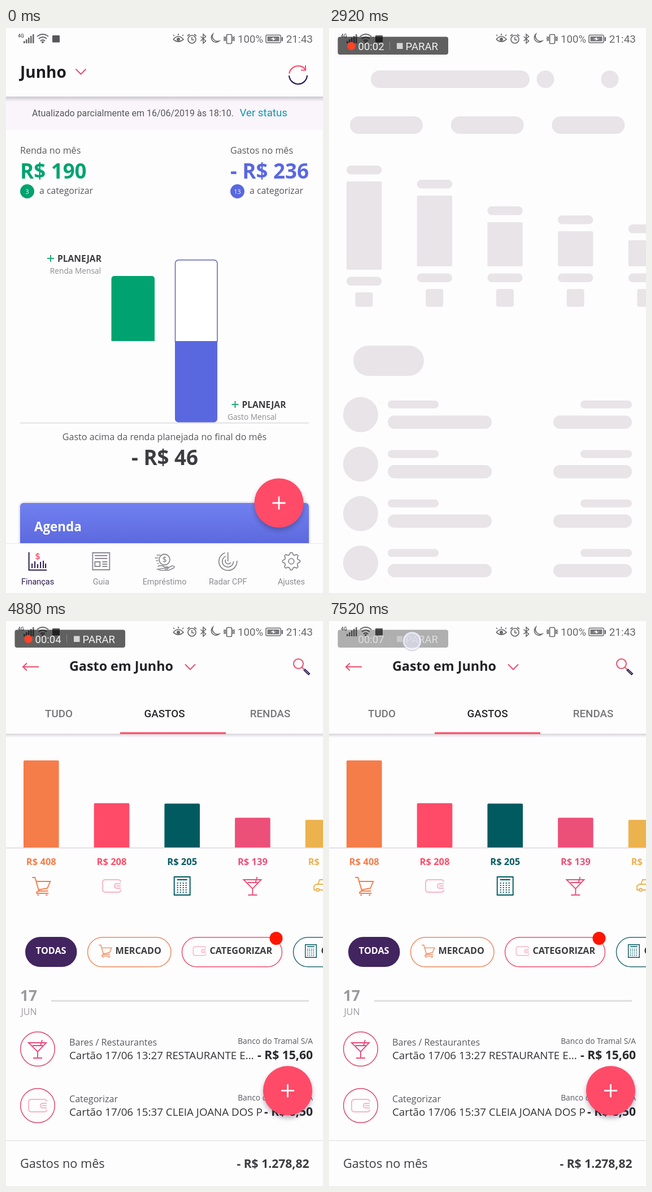
An HTML page with a canvas for the animation above (7560 ms loop, 561 by 998 pixels).

```html
<!DOCTYPE html>
<html lang="pt-BR">
<head>
<meta charset="utf-8">
<title>Finanças</title>
<style>
html, body { margin: 0; width: 100%; height: 100%; overflow: hidden; background: #fefdfe; }
canvas { display: block; }
</style>
</head>
<body>
<canvas id="stage" width="561" height="998"></canvas>
<script>
const c = document.getElementById('stage').getContext('2d');
const W = 561, H = 998, LOOP = 7560, STEP = 40;
const OPEN = '"Open Sans", sans-serif', ROBO = 'Roboto, sans-serif';
const PAPER = '#fefdfe', PINK = '#ff4b68', ROSE = '#e9506f', BLUSH = '#fab4c6', GREEN = '#00a36f',
  FOREST = '#00602f', BLUE = '#5968df', ORANGE = '#f47d4a', TEAL = '#005a60', MAGENTA = '#e8497a',
  YELLOW = '#ecb24e', INK = '#2b1a4d', DARK = '#3d3c40', TEXT = '#58575c', GRAY = '#8d8b91',
  BONE = '#e8e4e8', STATUS = '#69686c';

const clamp = u => Math.max(0, Math.min(1, u));
const quadOut = u => 1 - (1 - clamp(u)) ** 2;

function text(s, x, y, size, color, weight = 400, align = 'left', font = OPEN) {
  c.font = `${weight} ${size}px ${font}`;
  c.textAlign = align;
  c.fillStyle = color;
  c.fillText(s, x, y);
}
function box(x, y, w, h, r, fill, stroke, lw = 1.5) {
  c.beginPath();
  c.roundRect(x, y, w, h, r);
  if (fill) { c.fillStyle = fill; c.fill(); }
  if (stroke) { c.strokeStyle = stroke; c.lineWidth = lw; c.stroke(); }
}
function disc(x, y, r, fill, stroke, lw = 1.5) {
  c.beginPath();
  c.arc(x, y, r, 0, 7);
  if (fill) { c.fillStyle = fill; c.fill(); }
  if (stroke) { c.strokeStyle = stroke; c.lineWidth = lw; c.stroke(); }
}
function path(d, x, y, color, lw = 2, k = 1, fill = false) {
  c.save();
  c.translate(x, y);
  c.scale(k, k);
  if (fill) { c.fillStyle = color; c.fill(new Path2D(d)); }
  else { c.strokeStyle = color; c.lineWidth = lw / k; c.stroke(new Path2D(d)); }
  c.restore();
}
function shade(y, h, alpha) {
  const g = c.createLinearGradient(0, y, 0, y + h);
  g.addColorStop(0, `rgba(60,50,70,${alpha})`);
  g.addColorStop(1, 'rgba(60,50,70,0)');
  c.fillStyle = g;
  c.fillRect(0, y, W, h);
}
const chevron = (x, y) => path('M-9 -4.5L0 4.5L9 -4.5', x, y, ROSE, 2);
const plus = (x, y, r, color, lw) => path(`M${-r} 0H${r}M0 ${-r}V${r}`, x, y, color, lw);

function fab(x, y) {
  c.save();
  c.shadowColor = 'rgba(40,30,60,.34)';
  c.shadowBlur = 9;
  c.shadowOffsetY = 5;
  disc(x, y, 43.6, PINK);
  c.restore();
  plus(x, y, 11.5, '#fff', 2.8);
}
function touch(x, y) {
  disc(x, y, 17, 'rgba(224,223,240,.72)', 'rgba(140,140,165,.45)', 1);
  disc(x, y, 14.5, null, 'rgba(255,255,255,.55)', 2.5);
}

// Category icons, centred on 0,0
const keys = [-5, -1, 3, 7, 11].map(y => `M-9 ${y}h2m3 0h2m3 0h2m3 0h2`).join('');
const ICONS = {
  wallet: 'M16 -7Q16 -11 11 -11H-11Q-16 -11 -16 -6V6Q-16 11 -11 11H11Q16 11 16 7M16 -4H9Q5 -4 5 0T9 4H16M8 0H16',
  cart: 'M-16 -15H-11L-4 9H12M-9 -8H16L11 4L-5 7M-4 9Q-9 10 -8 13H13M-7 16h3M8 16h3',
  calc: 'M-14 -16H14V16H-14ZM-9 -11H9' + keys,
  glass: 'M-16 -11H15L0 5ZM0 5V16M-8 16H8M-9 -6H9M5 -6L8 -16',
  car: 'M-12 7H-16V0L-12 -3H-9L-6 -11H8L13 -3L17 0V7H13M-7 7H7M-9 -3H13M-12 7a2.5 2.5 0 0 0 5 0a2.5 2.5 0 0 0 -5 0',
  cash: 'M-12 -3L-15 0L-12 3M12 -3L15 0L12 3M-3 -13L0 -16L3 -13M-3 13L0 16L3 13'
};
function icon(name, x, y, color, k = 1) {
  path(ICONS[name], x, y, color, k < 1 ? 1.4 : 1.9, k);
  if (name === 'cash') text('$', x, y + 6 * k, 17 * k, color, 700, 'center');
}

function statusBar() {
  text('4G', 21, 17, 8.5, STATUS, 700, 'left', ROBO);
  for (let i = 0; i < 5; i++) { c.fillStyle = STATUS; c.fillRect(31 + i * 4, 23 - i * 3, 2.6, 4 + i * 3); }
  path('M-10 -5Q0 -13 10 -5M-7 -1Q0 -7 7 -1M-4 3Q0 -1 4 3', 65, 20, STATUS, 2);
  disc(65, 25, 2, STATUS);
  box(82, 13, 13, 12.5, 1, '#57565a');
  path('M-9 1Q0 -9 9 1Q0 9 -9 1M-7 -5L-9 -7M0 -6V-9M7 -5L9 -7', 305, 19, STATUS, 1.7);
  disc(305, 20, 3, STATUS);
  disc(329, 20, 7, null, STATUS, 1.7);
  path('M0 -4V1H4M-8 -6L-4 -9M8 -6L4 -9', 329, 20, STATUS, 1.7);
  path('M-4.5 -4L4.5 4L0 8V-8L4.5 -4L-4.5 4', 349, 19, STATUS, 1.6);
  path('M-3 -8A8 8 0 1 0 8 4A9 9 0 0 1 -3 -8Z', 369, 19, STATUS, 1.7);
  box(390.5, 11.5, 9, 16, 1.5, null, STATUS, 1.7);
  path('M-6.5 -4V4M6.5 -4V4M-9.5 -4l1.5 2l-1.5 2l1.5 2l-1.5 2M9.5 -4l-1.5 2l1.5 2l-1.5 2l1.5 2', 395, 19, STATUS, 1.4);
  text('100%', 410, 26.3, 18.7, STATUS, 400, 'left', ROBO);
  box(460, 12.5, 26, 13.5, 2, null, STATUS, 1.5);
  box(462.5, 15, 21, 8.5, 0, '#77767a');
  c.fillStyle = STATUS; c.fillRect(487.5, 16, 2.5, 7);
  path('M-6 1L1 -3V0L6 -1L-1 3V0Z', 473, 19.3, '#fff', 1, 1, true);
  text('21:43', 543, 26.3, 19, STATUS, 400, 'right', ROBO);
}

function navBar() {
  c.fillStyle = PAPER;
  c.fillRect(0, 910, W, 88);
  c.fillStyle = '#e9e7ea';
  c.fillRect(0, 910, W, 1);
  const at = i => W / 5 * (i + .5);
  ['Finanças', 'Guia', 'Empréstimo', 'Radar CPF', 'Ajustes'].forEach((s, i) =>
    text(s, at(i), 982.5, 14.4, i ? GRAY : INK, 400, 'center', ROBO));
  path('M-15.5 -16V15.5H16M-10 12V4M-5 12V0M0 12V5M5 12V1M10 12V-1M14 12V4', at(0), 942, INK, 2);
  text('$', at(0), 938.5, 16, PINK, 600, 'center');
  path('M-15 -15H15V15H-15ZM-11 -10H11M-11 -5H11M-11 1H-2V9H-11ZM2 1H11M2 5H11M2 9H11', at(1), 942, GRAY, 1.9);
  disc(280.5, 939, 9.5, null, GRAY, 1.8);
  text('$', 280.5, 944, 13.5, GRAY, 600, 'center');
  path('M-14 -11H-7M-17 -6H-11M-15 -1H-11M-13 4H-10M-12 9Q-6 6 0 10H6Q8 13 4 14H0M7 11L14 8Q20 9 16 12L7 16H-7L-12 14Z', at(2), 942, GRAY, 1.7);
  path('M0 -16V0M-5 -15A16 16 0 1 0 16 -1M-4 -9A10 10 0 1 0 10 0M-4 -3A5 5 0 1 0 5 2', at(3), 942, GRAY, 1.8);
  c.beginPath();
  for (let i = 0; i < 32; i++) {
    const a = (i - 1.5) * Math.PI / 16, r = i % 4 === 1 || i % 4 === 2 ? 15.5 : 12;
    c.lineTo(at(4) + r * Math.sin(a), 942 - r * Math.cos(a));
  }
  c.closePath();
  c.lineWidth = 1.8; c.strokeStyle = GRAY; c.stroke();
  disc(at(4), 942, 4.8, null, GRAY, 1.8);
}

function summary(x, label, value, color, count) {
  text(label, x, 222, 16.1, TEXT);
  text(value, x, 266, 36.7, color, 700);
  disc(x + 12.5, 288.5, 12.5, color);
  text(count, x + 12.5, 292.5, 10.5, '#fff', 400, 'center');
  text('a categorizar', x + 34, 293, 15.8, TEXT);
}
function plan(x, y, label, labelX, align) {
  plus(x, y, 6, '#1fa87a', 2);
  text('PLANEJAR', x + 12, y + 6, 15.6, DARK, 700);
  text(label, labelX, y + 27, 13.7, GRAY, 400, align);
}

function home() {
  text('Junho', 25, 88, 28, '#1d1b20', 700);
  chevron(132.5, 77);
  c.lineWidth = 2.2;
  c.strokeStyle = PINK;
  c.beginPath(); c.arc(517, 83, 16, Math.PI * 1.05, Math.PI * 1.82); c.stroke();
  path('M530 66V74.5H522', 0, 0, PINK, 2);
  c.strokeStyle = INK; c.lineWidth = 2.2;
  c.beginPath(); c.arc(517, 83, 16, .05, Math.PI * .98); c.stroke();
  c.fillStyle = '#f9f5fa';
  c.fillRect(0, 122, W, 58);
  shade(121, 9, .24);
  text('Atualizado parcialmente em 16/06/2019 às 18:10.', 46, 156, 16, TEXT, 400, 'left', ROBO);
  text('Ver status', 413.5, 156, 18.7, '#1496ae', 400, 'left', ROBO);
  summary(25, 'Renda no mês', 'R$ 190', GREEN, '3');
  summary(397, 'Gastos no mês', '- R$ 236', BLUE, '13');
  plan(79, 407, 'Renda Mensal', 168, 'right');
  plan(405.5, 665, 'Gasto Mensal', 392, 'left');
  box(186.5, 438, 76.5, 115, [5, 5, 0, 0], GREEN);
  box(299.5, 409.7, 74.5, 144, [6, 6, 0, 0], '#fff', '#5b64b8', 1.5);
  c.fillStyle = '#d6d4d9';
  c.fillRect(25, 697, 511, 1.3);
  box(299, 553, 75, 143.5, [0, 0, 6, 6], BLUE);
  text('Gasto acima da renda planejada no final do mês', 280.5, 728, 16.1, TEXT, 400, 'center');
  text('- R$ 46', 281, 772, 36.7, DARK, 700, 'center');
  const g = c.createLinearGradient(0, 839, 0, 912);
  g.addColorStop(0, '#7080f0');
  g.addColorStop(1, '#5c69de');
  c.save();
  c.shadowColor = 'rgba(40,30,80,.3)';
  c.shadowBlur = 5;
  box(25, 839, 511, 90, 6, g);
  c.restore();
  text('Agenda', 50, 888.5, 22.4, '#fff', 700);
  fab(483, 839);
  navBar();
}

function skeletonHead() {
  box(74, 75, 281, 31, 15.5, BONE);
  disc(383, 90.5, 15.5, BONE);
  disc(497, 90.5, 15.5, BONE);
  for (let i = 0; i < 3; i++) box(37 + i * 178.7, 156, 129, 31, 15.5, BONE);
}
function skeletonBody() {
  [271, 296, 343, 359, 375].forEach((top, i) => {
    const x = 31 + i * 124.7, d = i ? 0 : 6;
    box(x, top - 28, 62.3, 15.5, 7.7, BONE);
    box(x, top, 62.3, 421 + d - top, 2, BONE);
    box(x, 433.5 + d, 62.3, 15.5, 7.7, BONE);
    box(x + 15.5, 461 + d, 31, 31.5 - d, 4, BONE);
  });
  box(43, 561, 125, 53.5, 26.7, BONE);
  for (let i = 0; i < 4; i++) {
    const y = 683 + i * 87.4;
    disc(56, y, 31, BONE);
    box(104, y - 25, 90, 14, 7, BONE);
    box(104, y + 1.5, 184, 23.5, 11.7, BONE);
    box(445, y - 25, 91, 14, 7, BONE);
    box(397, y + 1.5, 139, 23.5, 11.7, BONE);
  }
}

function header(title, arrowX, active, mark) {
  path('M28 0H0M7 -6.5L0 0L7 6.5', 30, 81, ROSE, 2);
  text(title, 112, 87.5, 23.3, '#232226', 700);
  chevron(arrowX, 81);
  disc(517.5, 75.5, 8.5, null, ROSE, 2);
  path('M524 82L527 85', 0, 0, ROSE, 2);
  path('M527.5 85.5L537 94.5', 0, 0, INK, 4.4);
  path('M528.5 86.5L536 93.5', 0, 0, '#d9d5e0', 1);
  shade(199, 7, .2);
  ['TUDO', 'GASTOS', 'RENDAS'].forEach((s, i) =>
    text(s, W / 6 * (2 * i + 1), 169.5, 18.8, i === active ? '#29282c' : '#77767a', 500, 'center', ROBO));
  c.fillStyle = PINK;
  c.fillRect(mark, 196.5, 187, 3.2);
}
function bars(list, axis, grow) {
  c.fillStyle = '#dcdadd';
  c.fillRect(0, 400, axis, 1.6);
  list.forEach(([label, color, h, name, tint], i) => {
    const x = 31 + i * 124.7, mid = x + 31.3, hh = h * grow(i);
    if (hh > .3) box(x, 400 - hh, 62.6, hh, [2, 2, 0, 0], color);
    text(label, mid, 431, 16.5, color, 700, 'center');
    icon(name, mid, 468, tint || color);
  });
}
function pill(x, w, label, name, color, tint) {
  box(x, 558.8, w, 52, 26, PAPER, color, 1.5);
  icon(name, x + 31, 583, tint || color, .7);
  text(label, x + 49, 588, 16.2, DARK, 700);
}
function pills(list, dotX) {
  box(34, 558, 91.5, 53, 26.5, '#42245f');
  text('TODAS', 79.7, 588, 16.2, '#fff', 700, 'center');
  list.forEach(p => pill(...p));
  disc(dotX, 560.5, 11.5, '#ff1500');
}
function day(n, y) {
  text(n, 25, y + 9.5, 26.3, '#9b999f', 700);
  text('JUN', 26.5, y + 34.5, 16.1, '#9b999f');
  c.fillStyle = '#dfdde1';
  c.fillRect(80, y + 8.5, 456, 3);
}
function entry(y, name, tint, kind, what, bank, value) {
  disc(56, y, 30.3, null, '#df486c', 1.5);
  icon(name, 56, y, tint);
  text(kind, 112, y - 6.5, 16.1, TEXT);
  text(what, 112, y + 18, 18.8, '#333236');
  text(bank, 543, y - 9, 13.8, TEXT, 400, 'right');
  text(value, 543, y + 17.5, 21.1, '#29282c', 700, 'right');
}
function footer(label, value) {
  fab(498.5, 829.7);
  c.fillStyle = PAPER;
  c.fillRect(0, 917, W, 81);
  c.fillStyle = '#e3e1e4';
  c.fillRect(0, 917, W, 1.3);
  text(label, 25, 966, 21.7, DARK);
  text(value, 536.5, 966, 21.1, DARK, 700, 'right');
}

// Each bar starts 100 ms after the one before it
const growFrom = (t, start) => i => quadOut((t - start - 100 * i) / 400);

function income(t) {
  header('Renda em Junho', 333, 2, 374);
  bars([['R$ 1.486', PINK, 154, 'wallet', BLUSH], ['R$ 190', FOREST, 20, 'cash']], 249, growFrom(t, 3130));
  pills([[144.5, 177, 'CATEGORIZAR', 'wallet', ROSE, BLUSH], [341, 199, 'OUTRAS RENDAS', 'cash', '#2f7357', FOREST]], 310.5);
  ['13', '10'].forEach((n, i) => {
    day(n, 661 + 170 * i);
    entry(756 + 170 * i, 'wallet', BLUSH, 'Categorizar', 'Pagamento recebido', 'Dovexa', 'R$ 80,00');
  });
  footer('Renda no mês', 'R$ 1.676,11');
}

function spending(t) {
  const mark = t < 4920 ? 374 - 172 * quadOut((t - 4320) / 360) : 187;
  header('Gasto em Junho', 326, 1, mark);
  if (t < 4880) return skeletonBody();
  const grow = t < 5250 ? () => 1 - quadOut((t - 4940) / 260) : growFrom(t, 5258);
  bars([
    ['R$ 408', ORANGE, 153.7, 'cart'], ['R$ 208', PINK, 78.3, 'wallet', BLUSH], ['R$ 205', TEAL, 77.4, 'calc'],
    ['R$ 139', '#ec4f78', 52.4, 'glass'], ['R$ 130', YELLOW, 48.8, 'car']
  ], W, grow);
  pills([
    [144.5, 147.5, 'MERCADO', 'cart', '#ec8a5e'], [311.5, 177, 'CATEGORIZAR', 'wallet', ROSE, BLUSH],
    [508.5, 150, 'CONTAS', 'calc', '#256f73', TEAL]
  ], 478);
  day('17', 661);
  const bank = 'Banco do Tramal S/A';
  entry(756, 'glass', MAGENTA, 'Bares / Restaurantes', 'Cartão 17/06 13:27 RESTAURANTE E...', bank, '- R$ 15,60');
  entry(856, 'wallet', BLUSH, 'Categorizar', 'Cartão 17/06 15:37 CLEIA JOANA DOS P', bank, '- R$ 8,50');
  footer('Gastos no mês', '- R$ 1.278,82');
}

function recorder(t) {
  if (t < 40) return;
  const alpha = t < 7440 ? Math.min(1, t / 200) : 1 - (t - 7400) / 240;
  c.save();
  c.globalAlpha = alpha;
  box(15.5, 15.5, 195.5, 31.5, 4, 'rgba(0,0,0,.62)');
  const beat = t % 1000;
  if (beat >= 540 || beat < 40) disc(39.5, 32, 7.2, '#ff4326');
  c.fillStyle = 'rgba(255,255,255,.25)';
  c.fillRect(107, 24, 1, 15);
  // The lettering fades more slowly than the panel
  c.globalAlpha = Math.sqrt(alpha);
  c.fillStyle = '#d5d4d6';
  c.fillRect(120, 26.5, 10.5, 10.5);
  text('00:0' + Math.floor((t - 40) / 1000), 51.5, 38.5, 18.5, '#f4f3f4', 400, 'left', ROBO);
  text('PARAR', 135.5, 38.5, 18.5, '#f4f3f4', 400, 'left', ROBO);
  c.restore();
  if (t >= 7360) touch(147, 35.5);
}

function slideIn(t) {
  const u = clamp((t - 2452) / 354), left = (1 + Math.cos(Math.PI * u)) / 2;
  c.save();
  c.globalAlpha = 1 - left ** 1.2;
  c.translate(Math.round(W * left), 0);
  c.fillStyle = PAPER;
  c.fillRect(0, 48, W, H);
  skeletonHead();
  skeletonBody();
  c.restore();
}

function draw(t) {
  c.fillStyle = PAPER;
  c.fillRect(0, 0, W, H);
  if (t < 3120) {
    home();
    if (t > 2452) slideIn(t);
    if (t >= 2240 && t < 2400) touch(85, 253);
  } else if (t < 4320) {
    income(t);
    if (t >= 4200) touch(281, 163);
  } else spending(t);
  statusBar();
  recorder(t);
}

const start = performance.now();
function tick() {
  const t = (performance.now() - start) % LOOP;
  draw(Math.floor(t / STEP) * STEP);
  requestAnimationFrame(tick);
}
tick();
</script>
</body>
</html>
```
